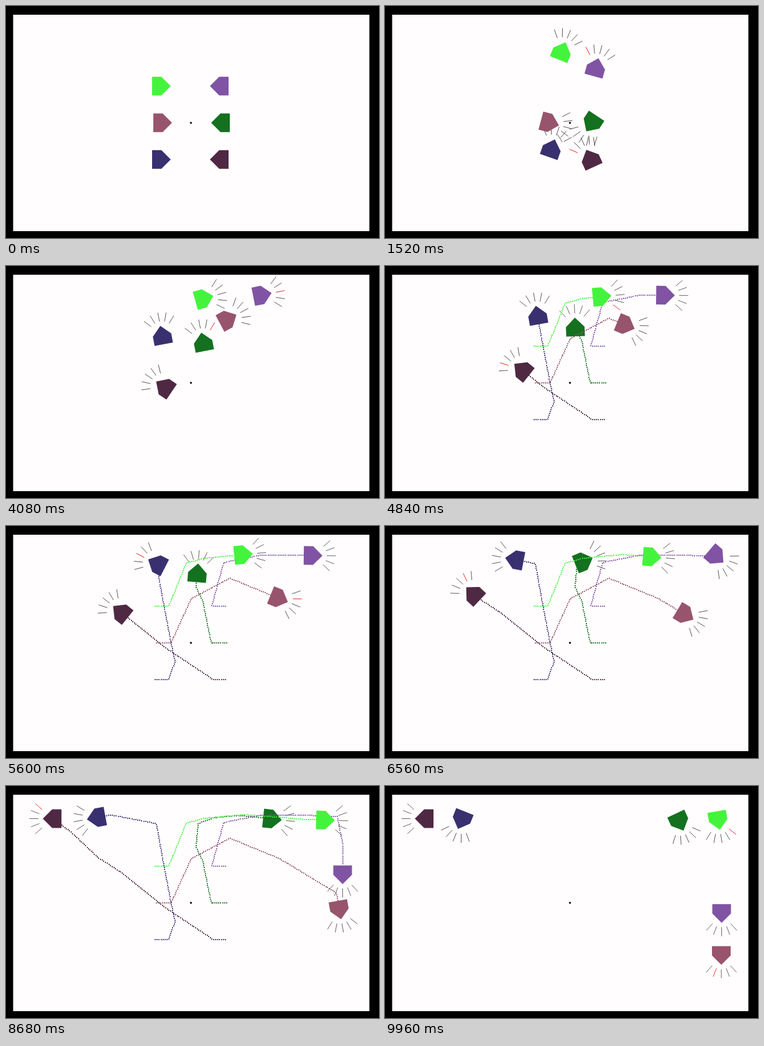
Write an HTML page with a canvas that moves like this. It is 600 by 373 pixels and loops after 10000 ms.

```html
<!DOCTYPE html>
<html lang="en">
<head>
<meta charset="utf-8">
<title>Robot swarm</title>
<style>
  html, body { margin: 0; width: 100%; height: 100%; overflow: hidden; background: #000; }
  canvas { display: block; width: 600px; height: 373px; }
</style>
</head>
<body>
<canvas id="stage" width="600" height="373"></canvas>
<script>
const ctx = document.getElementById('stage').getContext('2d');
const LOOP = 10000, STEP = 40, START = 120, SET_OFF = 600;
const TURN = 0.16;      // degrees per ms
const MARKERS = [2300, 3600], TRAILS = [4700, 8900];
const rad = deg => deg * Math.PI / 180;
const within = (t, [a, b]) => t >= a && t < b;
const shortTurn = deg => ((deg + 540) % 360 + 360) % 360 - 180;

// Robots start in two facing columns, roll forward, then visit stops [x, y, arrival].
// At every stop a robot first pivots towards the next one, then drives straight.
function robot(color, side, row, ...stops) {
  const x = (side < 0 ? 250 : 343) + row % 2 * 2, y = 128.7 + 59 * row;
  const route = [[x, y, START], [x - 12 * side, y, SET_OFF], ...stops];
  let heading = side < 0 ? 0 : 180;
  const legs = route.slice(1).map((to, i) => {
    const from = route[i];
    const aim = Math.atan2(to[1] - from[1], to[0] - from[0]) * 180 / Math.PI;
    const turn = shortTurn(aim - heading);
    const leg = { from, to, heading, turn, pivot: Math.abs(turn) / TURN };
    heading += turn;
    return leg;
  });
  return { color, legs, tail: [x + 10 * side, y] };
}

const robots = [
  robot('#4f2943', 1, 2, [330, 244.5, 1600], [314.5, 234.5, 3080], [254, 194, 4080],
    [184, 138, 5600], [148, 115, 6320], [104, 73.5, 7560], [76, 52.5, 8400], [63, 52.5, 9000]),
  robot('#39306f', -1, 2, [272, 218, 1800], [265, 185, 3080], [251, 111, 4080],
    [242, 60.5, 5270], [168.5, 46.5, 7560], [123, 55, 9600], [90, 140, 13000]),
  robot('#14711f', 1, 1, [332, 189.2, 1600], [329, 183, 3040], [317, 122, 4080],
    [306, 98, 4700], [309, 61, 6050], [334, 51, 6700], [376, 47.5, 7560],
    [474, 58, 9590], [480, 200, 12000]),
  robot('#98546d', -1, 1, [265.5, 188.1, 1650], [298, 117, 2920], [360, 84, 4120],
    [439.5, 116.5, 5600], [531.5, 172, 7560], [541, 225, 9440], [541, 272.5, 9960]),
  robot('#8153a4', 1, 0, [350, 60, 1850], [354, 58, 3080], [412.5, 46.5, 4080],
    [494, 47.5, 5600], [533, 49, 6320], [541.5, 91.5, 7560], [541.5, 205, 9960]),
  robot('#44f43c', -1, 0, [289, 62, 1610], [290, 60, 3080], [319, 52, 4080],
    [382, 46, 5600], [483, 54, 7560], [536, 55.5, 9470], [536, 200, 12000])
];

function pose({ legs }, t) {
  const { from, to, heading, turn, pivot } = legs.find(l => t < l.to[2]) || legs[legs.length - 1];
  const spent = Math.max(0, t - from[2]);
  const spin = pivot ? Math.min(1, spent / pivot) : 1;
  const drive = Math.max(0, Math.min(1, (spent - pivot) / (to[2] - from[2] - pivot)));
  return [
    from[0] + (to[0] - from[0]) * drive,
    from[1] + (to[1] - from[1]) * drive,
    heading + turn * spin
  ];
}

// Seeded noise: now and then a ray lights up for a moment.
function lit(id, ray, t) {
  const n = Math.sin(id * 12.99 + ray * 78.23 + Math.floor(t / 160) * 37.72) * 43758.5;
  return n - Math.floor(n) < 0.06;
}

function disc(x, y, r, color) {
  ctx.fillStyle = color;
  ctx.beginPath();
  ctx.arc(x, y, r, 0, 2 * Math.PI);
  ctx.fill();
}

function drawTrail({ color, legs, tail }, t, x, y) {
  const passed = legs.filter(l => l.to[2] <= t).map(l => l.to);
  const points = [tail, ...passed, [x, y]];
  const gap = 3.2;
  let offset = 0;
  ctx.fillStyle = color;
  for (let i = 1; i < points.length; i++) {
    const [ax, ay] = points[i - 1], [bx, by] = points[i];
    const length = Math.hypot(bx - ax, by - ay);
    for (; offset < length; offset += gap) {
      const k = offset / length;
      ctx.fillRect(Math.round(ax + (bx - ax) * k) - 1, Math.round(ay + (by - ay) * k) - 1, 1.8, 1.8);
    }
    offset -= length;
  }
}

function drawRobot(bot, id, t) {
  const [x, y, heading] = pose(bot, t);
  if (within(t, TRAILS)) drawTrail(bot, t, x, y);
  ctx.save();
  ctx.translate(x, y);
  ctx.rotate(rad(heading));
  ctx.fillStyle = bot.color;
  ctx.beginPath();
  [[-15, -15], [0, -15], [15, 0], [0, 15], [-15, 15]].forEach(p => ctx.lineTo(...p));
  ctx.fill();
  if (t >= START) {
    ctx.lineWidth = 0.8;
    for (let ray = -2; ray <= 2; ray++) {
      const c = Math.cos(rad(ray * 21)), s = Math.sin(rad(ray * 21));
      ctx.strokeStyle = lit(id, ray, t) ? '#e01010' : '#444';
      ctx.beginPath();
      ctx.moveTo(22 * c, 22 * s);
      ctx.lineTo(36.5 * c, 36.5 * s);
      ctx.stroke();
    }
  }
  if (within(t, MARKERS)) {
    for (const side of [-1, 1]) {
      disc(-15, 15 * side, 3.8, '#f00808');
      disc(20, 16.5 * side, 3.8, '#f00808');
    }
  }
  ctx.restore();
}

function draw(now) {
  const t = Math.floor((now % LOOP) / STEP) * STEP;
  ctx.fillStyle = '#000';
  ctx.fillRect(0, 0, 600, 373);
  ctx.fillStyle = '#fffdfe';
  ctx.fillRect(11.5, 14, 573, 348);
  robots.forEach((bot, id) => drawRobot(bot, id, t));
  disc(297.5, 187.8, 1.6, '#000');
}

const begin = performance.now();
function tick() {
  draw(performance.now() - begin);
  requestAnimationFrame(tick);
}
tick();
</script>
</body>
</html>
```
